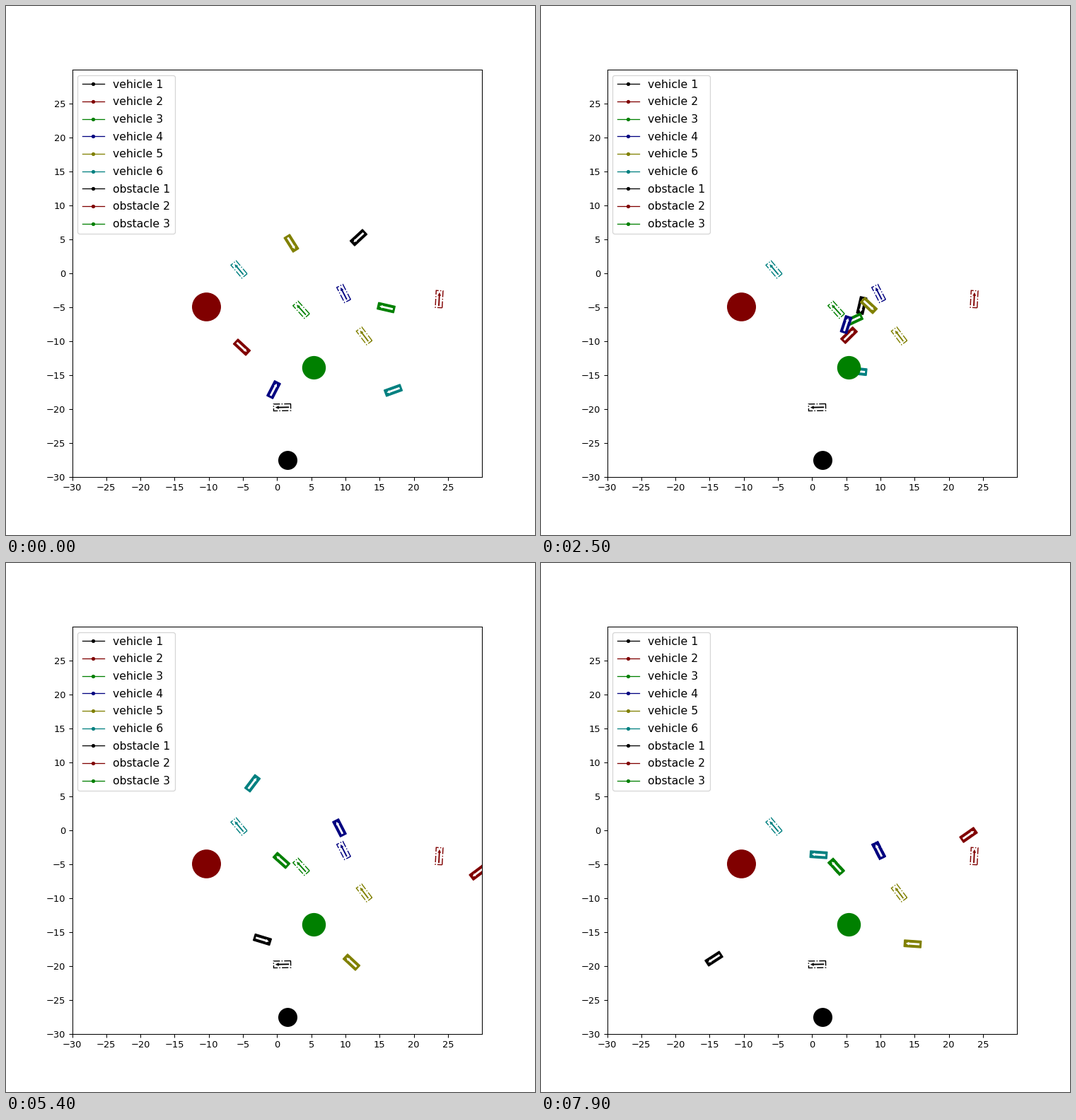
Recreate the animation shown at these times as a matplotlib script. Size 748 by 748 pixels, loop 8000 ms.

```python
import numpy as np
import matplotlib.pyplot as plt
from matplotlib.animation import FuncAnimation
from matplotlib.patches import Circle, Polygon

SIZE, DPI = 748, 93.5
MIN_RADIUS = 3.0                              # tightest turn, in axis units
TIMES = np.array([1, 25, 38, 54, 67, 79])     # key times in steps of 100 ms

# Key poses: x and y on the stage, heading in unwrapped degrees.
# A vehicle that runs out of poses parks on its goal.
ROUTES = {
    "black": [(498, 327, 223), (453, 423, 257), (415, 544, 229),
              (362, 532, -17), (361, 563, -233), (244, 559, -147)],
    "maroon": [(333, 482, -43), (435, 465, 45), (529, 371, 3),
               (667, 437, -143), (586, 428, -258), (604, 384, -325)],
    "green": [(537, 426, 167), (442, 443, 205), (396, 430, 122),
              (389, 420, 138)],
    "navy": [(378, 542, 63), (431, 450, 72), (484, 395, 104),
             (471, 374, 117)],
    "olive": [(403, 335, -58), (463, 423, -43), (536, 509, -12),
              (488, 564, -223), (539, 458, -390), (525, 538, -544)],
    "teal": [(547, 543, 200), (448, 516, 174), (320, 494, 140),
             (348, 311, 53), (497, 314, -68), (392, 412, -184)],
}
GOALS = [(390, 567, 181), (612, 414, 87), (417, 429, 132),
         (477, 406, 117), (506, 466, 127), (329, 372, 130)]
OBSTACLES = [(398, 642, 1.4), (283, 425, 2.12), (435, 511, 1.73)]


def to_data(x, y):
    """Centre of a stage pixel in axis units."""
    return np.array([((x + 0.5) / SIZE - 0.125) / 0.775,
                     (0.89 - (y + 0.5) / SIZE) / 0.77]) * 60 - 30


def unit(a):
    return np.stack([np.cos(a), np.sin(a)], axis=-1)


class Route:
    """Smooth car-like path through poses, driven forwards or in reverse."""

    def __init__(self, poses):
        self.pos = np.array([to_data(x, y) for x, y, _ in poses])
        self.ang = np.radians([p[2] for p in poses])
        chord = np.diff(self.pos, axis=0)
        half = np.abs(np.diff(self.ang)) / 2 + 1e-6
        mid = unit((self.ang[1:] + self.ang[:-1]) / 2)
        sign = np.sign((chord * mid).sum(axis=1))
        # each leg is about as long as a circular arc with the same turn
        arc = np.maximum(np.hypot(*chord.T) * half / np.sin(half),
                         2 * half * MIN_RADIUS)
        speed = np.gradient(np.append(0, np.cumsum(sign * arc)), TIMES)
        speed[0] = 0
        self.vel = speed[:, None] * unit(self.ang)
        self.turn = np.gradient(self.ang, TIMES)

    def pose(self, t):
        t = max(t, TIMES[0])
        i = min(np.searchsorted(TIMES, t, "right") - 1, len(TIMES) - 2)
        dt = TIMES[i + 1] - TIMES[i]
        u = (t - TIMES[i]) / dt
        place_w = [2*u**3 - 3*u**2 + 1, 3*u**2 - 2*u**3,
                   dt * (u**3 - 2*u**2 + u), dt * (u**3 - u**2)]
        speed_w = [6 * (u*u - u) / dt, 6 * (u - u*u) / dt,
                   3*u*u - 4*u + 1, 3*u*u - 2*u]

        def blend(w, p, v):
            return w[0]*p[i] + w[1]*p[i+1] + w[2]*v[i] + w[3]*v[i+1]

        pos = blend(place_w, self.pos, self.vel)
        ang = blend(place_w, self.ang, self.turn)
        vx, vy = blend(speed_w, self.pos, self.vel)
        # wheels roll along the path once the vehicle is moving
        off = (np.arctan2(vy, vx) - ang + np.pi / 2) % np.pi - np.pi / 2
        return pos, ang + off * min(1, np.hypot(vx, vy) / 0.4)


def arrow(length, shaft, head, width):
    a, neck = length / 2, length / 2 - head
    s, w = shaft / 2, width / 2
    return np.array([(-a, -s), (neck, -s), (neck, -w), (a, 0),
                     (neck, w), (neck, s), (-a, s)])


def place(shape, pos, ang):
    c, s = np.cos(ang), np.sin(ang)
    return shape @ np.array([(c, s), (-s, c)]) + pos


BODY = np.array([(-1.25, -0.5), (1.25, -0.5), (1.25, 0.5), (-1.25, 0.5)])
CAR_ARROW = arrow(2.0, 0.3, 0.45, 0.5)
GOAL_ARROW = arrow(2.0, 0.2, 0.5, 0.5)

fig, ax = plt.subplots(figsize=(SIZE / DPI, SIZE / DPI), dpi=DPI)
ax.set(xlim=(-30, 30), ylim=(-30, 30),
       xticks=range(-30, 30, 5), yticks=range(-30, 30, 5))

cars = []
for n, (color, keys) in enumerate(ROUTES.items()):
    goal = GOALS[n]
    pos, ang = to_data(*goal[:2]), np.radians(goal[2])
    ax.add_patch(Polygon(place(BODY, pos, ang), fill=False, ec=color,
                         lw=1.1, ls="-.", zorder=1))
    ax.add_patch(Polygon(place(GOAL_ARROW, pos, ang), fc=color, lw=0,
                         zorder=1))
    body = ax.add_patch(Polygon(BODY, fc=color, ec=color, lw=1,
                                joinstyle="miter", zorder=1.1 + n / 10))
    mark = ax.add_patch(Polygon(CAR_ARROW, fc="white", lw=0,
                                zorder=1.15 + n / 10))
    parked = [goal] * (len(TIMES) - len(keys))
    cars.append((Route(keys + parked), body, mark))
    ax.plot([], [], ".-", color=color, lw=1, label=f"vehicle {n + 1}")

for n, ((x, y, r), color) in enumerate(zip(OBSTACLES, ROUTES)):
    ax.add_patch(Circle(to_data(x, y), r, fc=color, lw=0, zorder=2))
    ax.plot([], [], ".-", color=color, lw=1, label=f"obstacle {n + 1}")

ax.legend(loc="upper left", fontsize=12, labelspacing=0.62)


def update(frame):
    for route, body, mark in cars:
        pos, ang = route.pose(frame)
        body.set_xy(place(BODY, pos, ang))
        mark.set_xy(place(CAR_ARROW, pos, ang))
    return [patch for car in cars for patch in car[1:]]


anim = FuncAnimation(fig, update, frames=80, interval=100,
                     repeat=True, repeat_delay=0)
plt.show()
```
